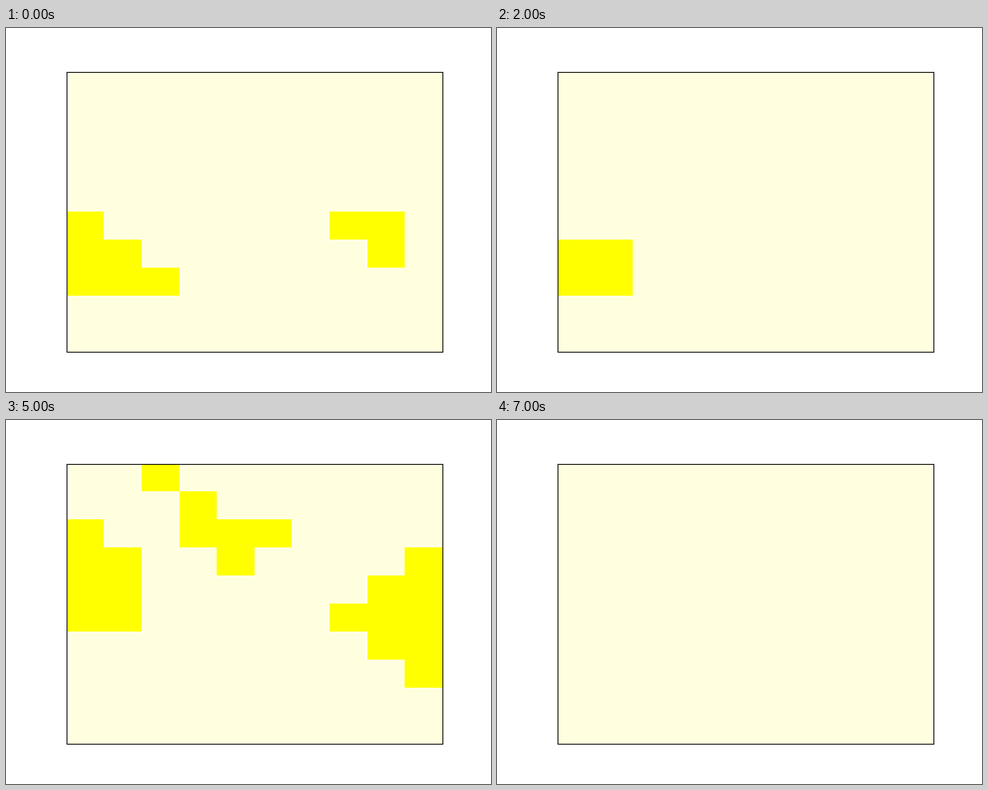
These frames come from a looping animation (640 by 480 pixels, 8000 ms). A matplotlib script:

```python
import numpy as np
import matplotlib.pyplot as plt
from matplotlib.animation import FuncAnimation
from matplotlib.colors import ListedColormap

SIZE = 10
EMPTY, YELLOW, GREEN = 0, 1, 2
STEP_MS = 1000

# Each run is (row, first column, last column, kind); row 0 is the top.
LEFT_STAIR = [(5 + k, 0, k, YELLOW) for k in range(3)]
RIGHT_HOOK = [(5, 7, 8, YELLOW), (6, 8, 8, YELLOW)]
BLOCK = [(6, 0, 1, YELLOW), (7, 0, 1, YELLOW)]
CANOPY = [(0, 0, 7, YELLOW), (1, 3, 6, YELLOW),
          (2, 4, 4, YELLOW), (3, 4, 4, YELLOW)]
GREEN_STEP = [(5, 5, 5, GREEN), (6, 4, 5, GREEN), (7, 3, 4, GREEN)]
ZIGZAG = [(1, 3, 3, YELLOW), (2, 3, 4, YELLOW), (3, 4, 4, YELLOW)]
BRANCHES = [(0, 2, 2, YELLOW), (2, 5, 5, YELLOW)]
LEFT_PATCH = [(2, 0, 0, YELLOW)] + [(r, 0, 1, YELLOW) for r in (3, 4, 5)]
RIGHT_DIAMOND = [(r, 7 + abs(r - 5), 9, YELLOW) for r in range(3, 8)]
LAST_CELL = [(5, 6, 6, YELLOW)]

STATES = [
    LEFT_STAIR + RIGHT_HOOK,
    LEFT_STAIR,
    BLOCK,
    CANOPY + GREEN_STEP,
    ZIGZAG,
    ZIGZAG + BRANCHES + LEFT_PATCH + RIGHT_DIAMOND,
    LAST_CELL,
    [],
]


def grid(runs):
    cells = np.full((SIZE, SIZE), EMPTY)
    for row, first, last, kind in runs:
        cells[row, first:last + 1] = kind
    return cells


fig, ax = plt.subplots(figsize=(6.4, 4.8), dpi=100)
fig.subplots_adjust(left=0.125, right=0.9, bottom=0.11, top=0.88)
ax.set_xticks([])
ax.set_yticks([])
cmap = ListedColormap(["lightyellow", "yellow", "lightseagreen"])
image = ax.imshow(grid(STATES[0]), cmap=cmap, vmin=EMPTY, vmax=GREEN,
                  aspect="auto", interpolation="nearest")


def update(i):
    image.set_data(grid(STATES[i % len(STATES)]))
    return (image,)


anim = FuncAnimation(fig, update, frames=len(STATES), interval=STEP_MS,
                     repeat=True, repeat_delay=0)
plt.show()
```
